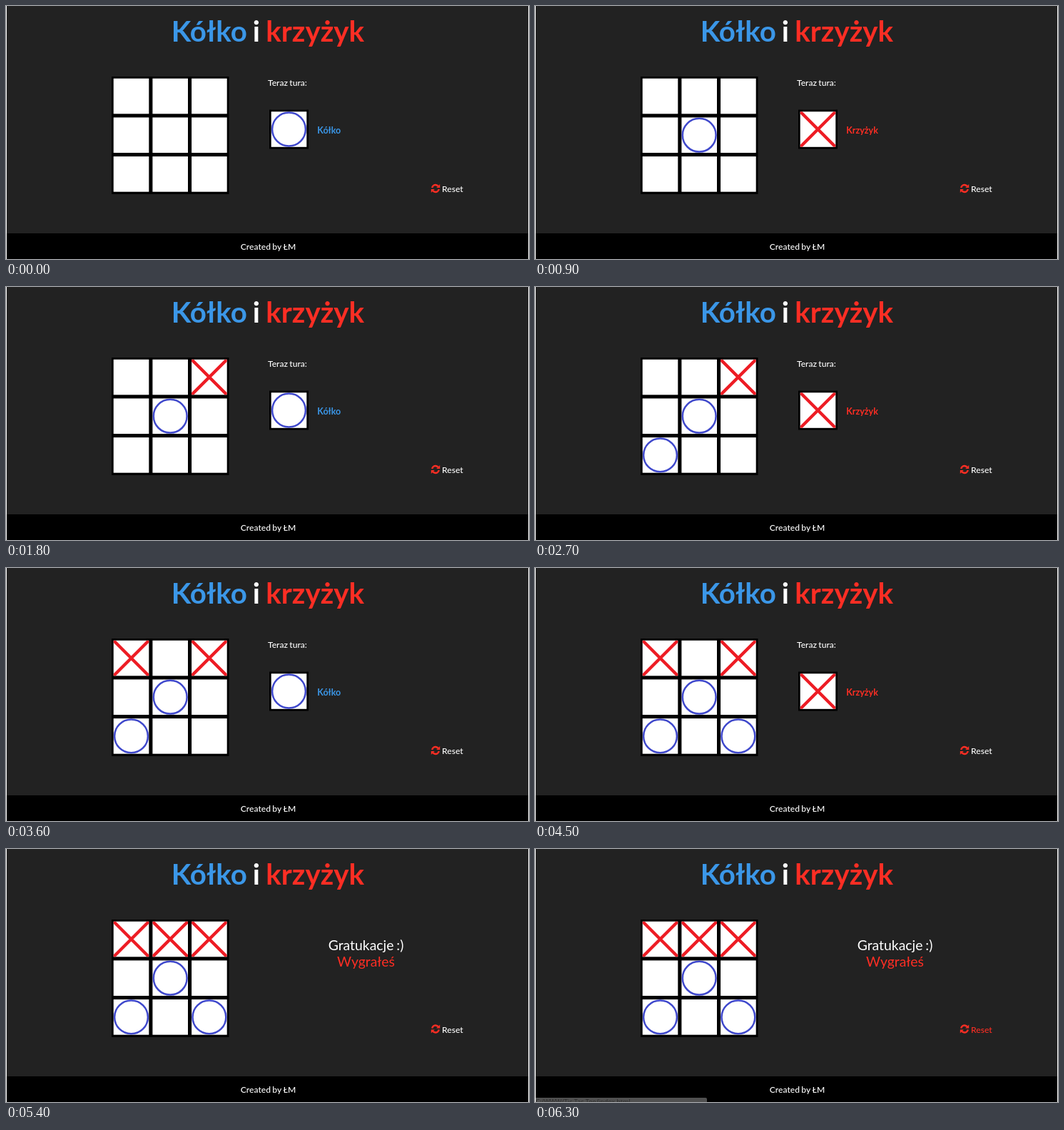
Write an HTML page with a canvas that moves like this. It is 733 px wide and 355 px high and loops after 7.2 s.

```html
<!DOCTYPE html>
<html lang="pl">
<head>
<meta charset="utf-8">
<title>Kółko i krzyżyk</title>
<style>
  html, body { margin: 0; width: 100%; height: 100%; overflow: hidden; background: #222; }
  canvas { display: block; }
</style>
</head>
<body>
<canvas id="stage" width="733" height="355"></canvas>
<script>
const ctx = document.getElementById('stage').getContext('2d');
const WIDTH = 733, HEIGHT = 355;
const STEP_MS = 900, STEPS = 8;
const BLUE = '#3b97e8', RED = '#fd2e24', WHITE = '#fff';
const CELL = 49.6, PITCH = 54.7;
const moves = [4, 2, 6, 0, 8, 1]; // cell indices, circle starts

function rect(color, x, y, w, h) {
  ctx.fillStyle = color;
  ctx.fillRect(x, y, w, h);
}

function text(str, x, y, { size = 12.1, color = WHITE, weight = 500, align = 'left' } = {}) {
  ctx.font = `${weight} ${size}px Lato, sans-serif`;
  ctx.wordSpacing = `${-0.06 * size}px`;
  ctx.textAlign = align;
  ctx.fillStyle = color;
  ctx.fillText(str, x, y);
}

function drawCircle(x, y) {
  ctx.strokeStyle = '#3f48cc';
  ctx.lineWidth = 2.5;
  ctx.beginPath();
  ctx.arc(x + CELL / 2, y + CELL / 2, 23.4, 0, Math.PI * 2);
  ctx.stroke();
}

function drawCross(x, y) {
  ctx.save();
  ctx.beginPath();
  ctx.rect(x, y, CELL, CELL);
  ctx.clip();
  ctx.strokeStyle = '#ed1c24';
  ctx.lineWidth = 4.4;
  ctx.beginPath();
  ctx.moveTo(x, y);
  ctx.lineTo(x + CELL, y + CELL);
  ctx.moveTo(x + CELL, y);
  ctx.lineTo(x, y + CELL);
  ctx.stroke();
  ctx.restore();
}

const drawMark = (turn, x, y) => (turn % 2 ? drawCross : drawCircle)(x, y);

function drawBoard(step) {
  rect('#000', 148, 99, 164.5, 165);
  for (let i = 0; i < 9; i++) {
    const x = 150.7 + (i % 3) * PITCH;
    const y = 101.7 + Math.floor(i / 3) * PITCH;
    rect(WHITE, x, y, CELL, CELL);
    const turn = moves.indexOf(i);
    if (turn >= 0 && turn < step) drawMark(turn, x, y);
  }
}

function drawTurn(turn) {
  text('Teraz tura:', 367, 111.5);
  rect('#000', 369, 145.5, 55, 55);
  rect(WHITE, 371.7, 148.2, CELL, CELL);
  drawMark(turn, 371.7, 148.2);
  const cross = turn % 2;
  text(cross ? 'Krzyżyk' : 'Kółko', 436.3, 178.5,
    { size: 12.5, color: cross ? RED : BLUE, weight: 700 });
}

function drawWin() {
  const message = { size: 19.4, weight: 400, align: 'center' };
  text('Gratukacje :)', 504.5, 141.5, message);
  text('Wygrałeś', 504.5, 164.5, { ...message, color: RED });
}

function drawReset(y, hovered) {
  ctx.save();
  ctx.translate(602, y - 0.5);
  ctx.strokeStyle = ctx.fillStyle = RED;
  ctx.lineWidth = 2.5;
  for (let half = 0; half < 2; half++) {
    ctx.beginPath();
    ctx.arc(0, 0, 4.9, Math.PI * 1.07, Math.PI * 1.77);
    ctx.stroke();
    ctx.beginPath();
    ctx.moveTo(6.2, -6);
    ctx.lineTo(6.2, -0.9);
    ctx.lineTo(1.2, -0.9);
    ctx.fill();
    ctx.rotate(Math.PI);
  }
  ctx.restore();
  text('Reset', 611, y + 4.5, { color: hovered ? RED : WHITE });
}

function drawStatusBar() {
  ctx.fillStyle = '#505050';
  ctx.beginPath();
  ctx.roundRect(1, 349, 240, 8, [0, 2, 0, 0]);
  ctx.fill();
  ctx.font = '9px "Open Sans", sans-serif';
  ctx.textAlign = 'left';
  ctx.fillStyle = '#2b2b2b';
  ctx.fillText('C:/WWW/Tic-Tac-Toe/index.html', 1, 357.5);
}

function draw(step) {
  const won = step >= moves.length;
  const hovered = step === STEPS - 1;
  rect(WHITE, 0, 0, WIDTH, HEIGHT);
  rect('#222', 1, 0, WIDTH - 2, 319);
  rect('#000', 1, 319, WIDTH - 2, HEIGHT - 319);

  const heading = { size: 40.3, weight: 700 };
  text('Kółko', 231.7, 50, { ...heading, color: BLUE });
  text('i', 345.7, 50, heading);
  text('krzyżyk', 364.3, 50, { ...heading, color: RED });

  drawBoard(step);
  if (won) drawWin();
  else drawTurn(step);
  drawReset(won ? 253 : 256.5, hovered);
  text('Created by ŁM', 367.5, 342, { align: 'center' });
  if (hovered) drawStatusBar();
}

function frame() {
  draw(Math.floor(performance.now() / STEP_MS) % STEPS);
  requestAnimationFrame(frame);
}
frame();
</script>
</body>
</html>
```
